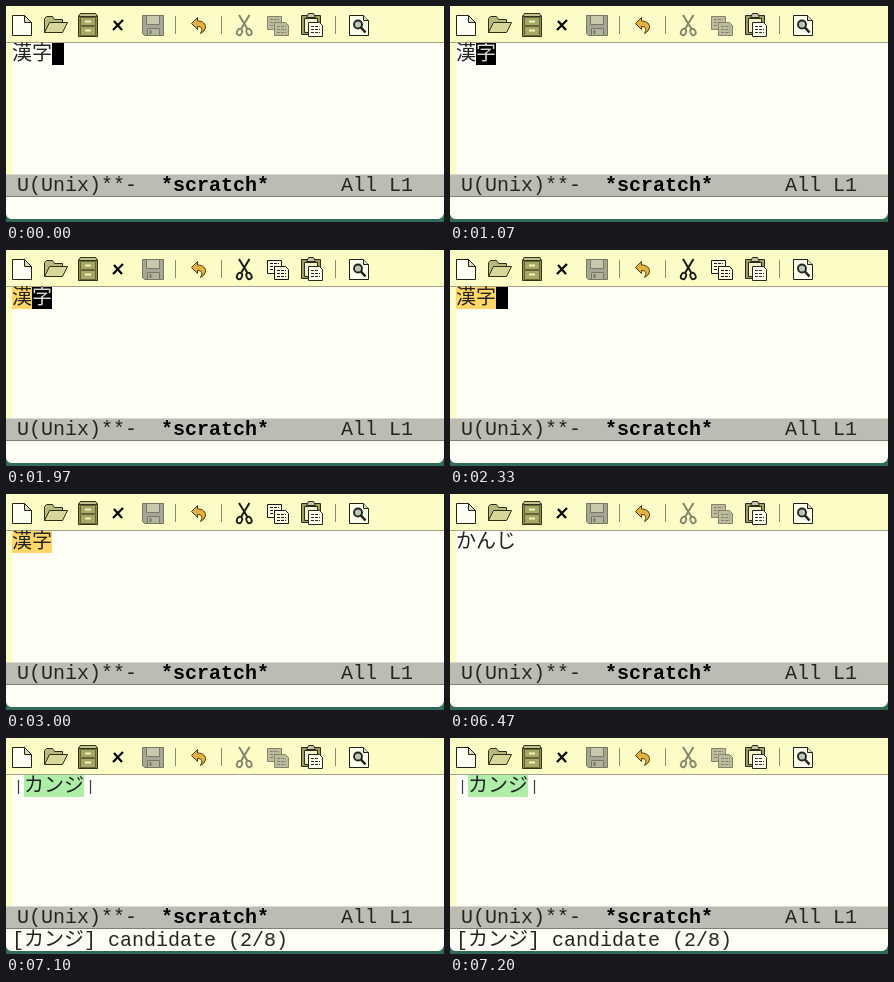
An HTML page for the animation above (8 s loop, 438 by 216 pixels).

```html
<!DOCTYPE html>
<html lang="ja">
<head>
<meta charset="utf-8">
<title>Kanji conversion</title>
<style>
html, body { margin: 0; width: 100%; height: 100%; overflow: hidden; background: #fefef7; }
svg { display: block; width: 438px; height: 216px; }
text { font: 20px "Liberation Mono", "DejaVu Sans Mono", monospace; fill: #26261e; }
.bold { font-weight: bold; fill: #000; }
.cjk { font: 100 20px "Noto Sans CJK JP", "Noto Sans CJK", sans-serif; fill: #222; }
.bar { font-size: 15px; fill: #344; }
#buffer { isolation: isolate; }

/* Every change is a hard cut on one shared 8 s clock */
#kanji, #mark, #bare, #first, #second, #cursor, #edit {
  animation: 8s step-end infinite;
}
#kanji { animation-name: kanji; }
#mark { animation-name: mark; }
#bare { animation-name: bare; }
#first { animation-name: first; }
#second { animation-name: second; }
#cursor { animation-name: cursor; mix-blend-mode: difference; }
#edit { animation-name: edit; }

@keyframes kanji {
  0% { opacity: 1; }
  80.875%, 100% { opacity: 0; }
}
@keyframes mark {
  0% { width: 0; }
  24.625% { width: 20px; }
  25.875% { width: 40px; }
  80.875%, 100% { width: 0; }
}
@keyframes bare {
  0% { opacity: 0; }
  80.875% { opacity: 1; }
  81.25%, 100% { opacity: 0; }
}
@keyframes first {
  0% { opacity: 0; }
  81.25% { opacity: 1; }
  88.75%, 100% { opacity: 0; }
}
@keyframes second {
  0% { opacity: 0; }
  88.75%, 100% { opacity: 1; }
}
/* The cursor reappears late after the region is redrawn, then blinks off */
@keyframes cursor {
  0% { x: 46px; width: 12px; }
  13.375% { x: 26px; width: 20px; }
  20% { x: 6px; width: 20px; }
  24.625% { x: 26px; width: 20px; }
  25.875% { x: 46px; width: 0; }
  29.125% { x: 46px; width: 12px; }
  37.5% { x: 90px; width: 0; }
  81.25% { x: 90px; width: 12px; }
  88.75%, 100% { x: 90px; width: 0; }
}
@keyframes edit {
  0% { color: #85856e; fill: #bcbc9c; }
  24.625% { color: #1a1a14; fill: #fffde0; }
  80.875%, 100% { color: #85856e; fill: #bcbc9c; }
}
</style>
</head>
<body>
<svg viewBox="0 0 438 216">
  <!-- window -->
  <rect width="438" height="216" fill="#2f6b57"/>
  <path d="M0 0H438V207Q437 213 431 213H6Q1 213 0 208Z" fill="#fefef7"/>
  <rect y="37" width="6" height="131" fill="#fcfcc6"/>
  <rect width="438" height="36" fill="#fcfcc6"/>
  <rect y="36" width="438" height="1" fill="#a4a486"/>

  <!-- tool bar -->
  <g stroke="#8d8d74">
    <path d="M169.5 10V28M215.5 10V28M329.5 10V28"/>
  </g>
  <g stroke="#222218" stroke-linejoin="round">
    <path d="M6.5 9.5H18.5L25.5 16.5V29.5H6.5Z" fill="#fffff4"/>
    <path d="M18.5 9.5V16.5H25.5Z" fill="#dcdcc4"/>
  </g>
  <g stroke="#2c3018" stroke-linejoin="round">
    <path d="M38.5 26.5V12.5L40.5 10.5H46.5L48.5 13.5H56.5V17" fill="#b8ba7c"/>
    <path d="M38.5 26.5L43.5 16.5H61.5L56.5 26.5Z" fill="#d6d89a"/>
  </g>
  <g stroke="#34361c" stroke-linejoin="round">
    <path d="M72.5 10.5L74.5 7.5H89.5L91.5 10.5V30.5H72.5Z" fill="#8c9050"/>
    <path d="M72.5 10.5L74.5 7.5H89.5L91.5 10.5Z" fill="#c0c48c"/>
    <path d="M74.5 11.5H89.5V19.5H74.5ZM74.5 20.5H89.5V29.5H74.5Z" fill="#a4a860" stroke="#62663a"/>
    <path d="M79 15.5H85M79 24.5H85" stroke="#f0f0c0" stroke-width="2"/>
  </g>
  <path d="M108 15L116 24M117 14L107 24" stroke="#000" stroke-width="2.2"/>
  <g stroke="#77776a" stroke-linejoin="round">
    <path d="M136.5 9.5H157.5V29.5H138.5L136.5 27.5Z" fill="#a6a694"/>
    <path d="M140.5 9.5H153.5V18.5H140.5Z" fill="#c8c8ac"/>
    <path d="M141.5 22.5H153.5V29.5H141.5Z" fill="#b4b49c"/>
    <path d="M144.5 24V28" stroke-width="2"/>
  </g>
  <path d="M185.5 17.5L191.5 11.5V15C197 15 200 18 199.5 22Q198.5 25.5 194.5 27.5C197 23 196 20.5 191.5 20.5V23.5Z"
        fill="#e4b040" stroke="#4c3810" stroke-linejoin="round"/>

  <g id="edit" stroke="currentColor">
    <path d="M233 9L241.5 23M243.5 9L235 23" stroke-width="2"/>
    <g fill="none" stroke-width="1.8">
      <ellipse cx="233.5" cy="26" rx="2.5" ry="3.3" transform="rotate(25 233.5 26)"/>
      <ellipse cx="243" cy="26" rx="2.5" ry="3.3" transform="rotate(-25 243 26)"/>
    </g>
    <path d="M261.5 10.5H275.5V23.5H261.5Z"/>
    <path d="M264 13.5H273M264 16.5H273M264 19.5H268" stroke-dasharray="3 1"/>
    <path d="M268.5 16.5H279.5L282.5 19.5V29.5H268.5Z"/>
    <path d="M271 20.5H280M271 23.5H280M271 26.5H280" stroke-dasharray="3 1"/>
  </g>

  <g stroke="#2c2c1c" stroke-linejoin="round">
    <path d="M295.5 9.5H314.5V28.5H295.5Z" fill="#a09a5c"/>
    <path d="M298.5 12.5H311.5V26.5H298.5Z" fill="#f0f0cc"/>
    <path d="M300.5 11.5L302.5 7.5H307.5L309.5 11.5Z" fill="#c4c4a4"/>
    <path d="M302.5 16.5H313.5L316.5 19.5V30.5H302.5Z" fill="#fffff0"/>
    <path d="M305 20.5H313M305 23.5H314M305 26.5H314" stroke-dasharray="3 1"/>
  </g>
  <g stroke="#222218" stroke-linejoin="round">
    <path d="M343.5 9.5H357.5L362.5 14.5V29.5H343.5Z" fill="#fffff0"/>
    <path d="M357.5 9.5V14.5H362.5" fill="#dcdcc4"/>
    <circle cx="352" cy="18.5" r="4" fill="#b8c8b8" stroke-width="1.8"/>
    <path d="M355 21.5L359.5 26.5" stroke-width="2.6"/>
  </g>

  <!-- mode line -->
  <rect y="168" width="438" height="23" fill="#bcbcb5"/>
  <rect y="168" width="438" height="1" fill="#d9d9cc"/>
  <rect y="190" width="438" height="1" fill="#7e7e74"/>
  <text x="11" y="185">U(Unix)**-</text>
  <text x="155" y="185" class="bold">*scratch*</text>
  <text x="335" y="185">All L1</text>

  <!-- buffer and echo area -->
  <g id="buffer">
    <rect x="6" y="37" width="432" height="131" fill="#fefef7"/>
    <rect id="mark" x="6" y="37" height="22" fill="#ffd768"/>
    <text id="kanji" class="cjk" x="6" y="54">漢字</text>
    <text id="bare" class="cjk" x="6" y="54">かんじ</text>
    <g id="first">
      <rect x="18" y="37" width="60" height="22" fill="#aeeea8"/>
      <text class="bar" x="8" y="53">|</text>
      <text class="cjk" x="18" y="54">かんじ</text>
      <text class="bar" x="80" y="53">|</text>
      <text x="6" y="208">[</text>
      <text class="cjk" x="18" y="208">かんじ</text>
      <text x="78" y="208">] candidate (1/8)</text>
    </g>
    <g id="second">
      <rect x="18" y="37" width="60" height="22" fill="#aeeea8"/>
      <text class="bar" x="8" y="53">|</text>
      <text class="cjk" x="18" y="54">カンジ</text>
      <text class="bar" x="80" y="53">|</text>
      <text x="6" y="208">[</text>
      <text class="cjk" x="18" y="208">カンジ</text>
      <text x="78" y="208">] candidate (2/8)</text>
    </g>
    <rect id="cursor" y="37" height="22" fill="#fefef7"/>
  </g>
</svg>
</body>
</html>
```
